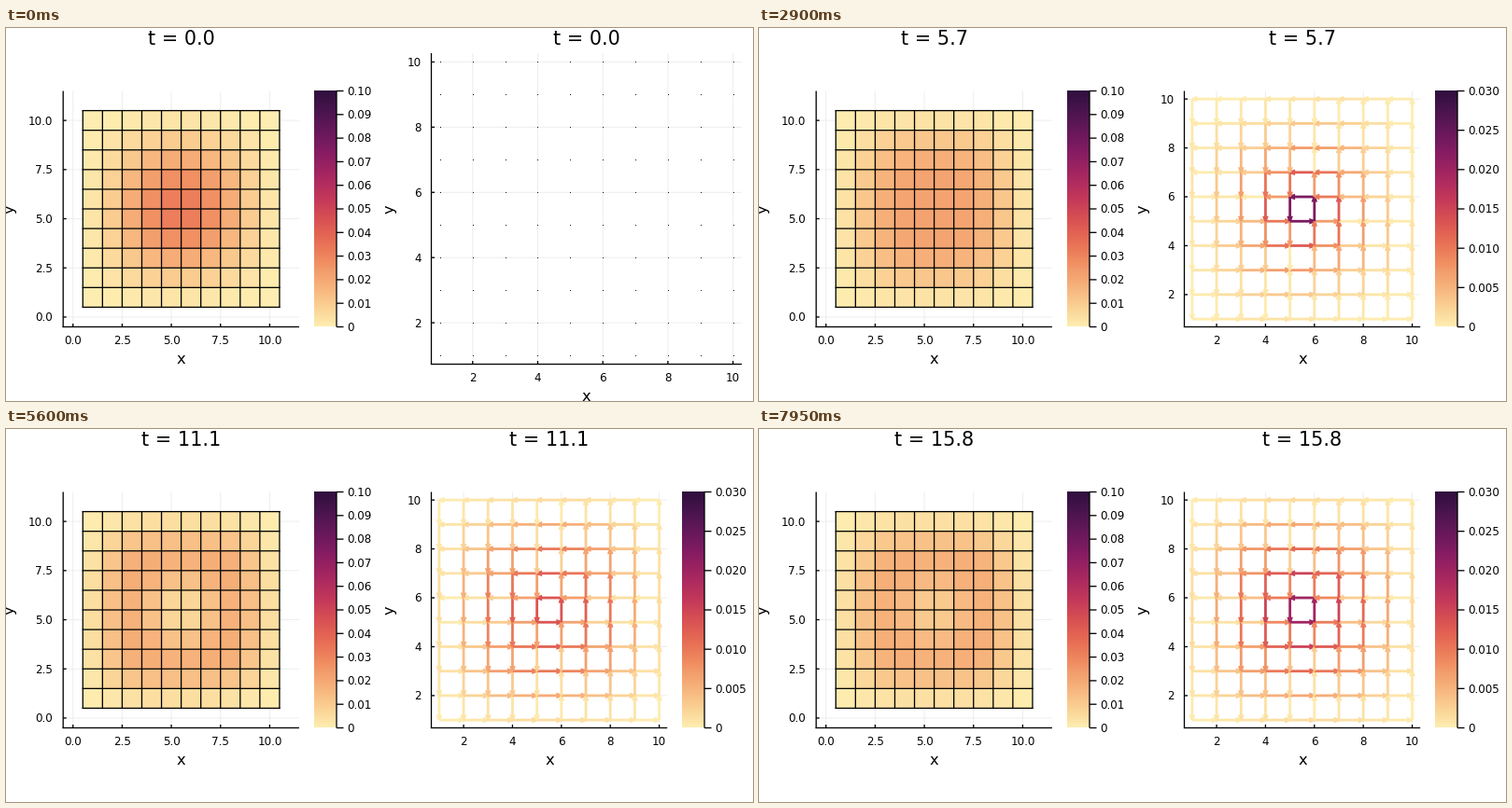
A matplotlib script for the animation above (8000 ms loop, 800 by 400 pixels).

```python
import numpy as np
import matplotlib.pyplot as plt
from matplotlib.animation import FuncAnimation
from matplotlib.collections import PolyCollection
from matplotlib.colors import LinearSegmentedColormap

N = 10
PX = 0.72  # points per pixel at 100 dpi
TICK, LABEL, TITLE = 11.9 * PX, 16.3 * PX, 20.75 * PX

matter = LinearSegmentedColormap.from_list("matter", [
    "#feedb0", "#facd91", "#f6ad77", "#f08e62", "#e76d54", "#d85053",
    "#c3385a", "#a82860", "#8a1d63", "#6b185d", "#4c1550", "#2f0f3e"])

plt.rcParams["font.family"] = "DejaVu Sans"
fig = plt.figure(figsize=(8, 4), dpi=100, facecolor="white")
ax = fig.add_axes([0, 0, 1, 1])
ax.axis("off")


# ---- drawing helpers, all in stage pixels ----
def line(xs, ys, color="black", width=1.3, z=3):
    return ax.plot(xs, ys, color=color, lw=width * PX, zorder=z,
                   solid_capstyle="butt", snap=False)[0]


def text(x, y, s, size=TICK, ha="center", **kw):
    return ax.text(x, y, s, fontsize=size, ha=ha, va=kw.pop("va", "baseline"),
                   color="black", zorder=6, **kw)


def scale(lim, lo, hi):
    return lambda v: lo + (np.asarray(v) - lim[0]) / (lim[1] - lim[0]) * (hi - lo)


def panel(box, lim, ticks, fmt, ylabel_x):
    """Frame, grid, ticks and labels; returns the artists and both scales."""
    x0, x1, y0, y1 = box
    sx, sy = scale(lim, x0, x1), scale(lim, y1, y0)
    parts = [line([x0, x0], [y0, y1 + 0.6]), line([x0 - 0.6, x1], [y1, y1])]
    for v in ticks:
        px, py, label = float(sx(v)), float(sy(v)), fmt % v
        parts += [
            line([px, px], [y0, y1], "#eeeeee", 1, 0),
            line([x0, x1], [py, py], "#eeeeee", 1, 0),
            line([px, px], [y1, y1 - 3.5]),
            line([x0, x0 + 3.5], [py, py]),
            text(px, y1 + 18.3, label),
            text(x0 - 11, py + 4.4, label, ha="right"),
        ]
    mid = (x0 + x1) / 2
    parts += [
        text(mid, y1 + 39.2, "x", LABEL),
        text(ylabel_x, 194, "y", LABEL, va="center", rotation=90),
    ]
    title = text(mid, 18.3, "", TITLE)
    return parts + [title], title, sx, sy


def colorbar(x, top, labels):
    y0, y1 = 67.5, 320.5
    bar = ax.imshow(np.linspace(1, 0, 256)[:, None], cmap=matter, vmin=0,
                    vmax=1, extent=(x, x + 24, y1, y0), aspect="auto",
                    interpolation="bilinear", zorder=1)
    parts = [bar, line([x + 24, x + 24], [y0, y1])]
    for s in labels:
        y = y1 - float(s) / top * (y1 - y0)
        parts += [line([x + 24, x + 31.5], [y, y]),
                  text(x + 35, y + 4.4, s, ha="left")]
    return parts


# ---- charged particle on a square lattice around a growing flux ----
site = np.arange(1, N + 1)
s1 = np.sin(np.pi * site / (N + 1)) ** 2
s2 = np.sin(2 * np.pi * site / (N + 1)) ** 2
norm = (2 / (N + 1)) ** 2
rho_rest = norm * np.outer(s1, s1)
rho_ring = norm / 2 * (np.outer(s1, s2) + np.outer(s2, s1))

edges = []
for i in range(N):
    for j in range(N):
        if i < N - 1:
            edges.append((i, j, i + 1, j))
        if j < N - 1:
            edges.append((i, j, i, j + 1))
edges = np.array(edges)
tail, head = edges[:, :2] + 1, edges[:, 2:] + 1
ti, hi = edges[:, 1] * N + edges[:, 0], edges[:, 3] * N + edges[:, 2]

a, b = tail - 5.5, head - 5.5
angle = np.arctan2(a[:, 0] * b[:, 1] - a[:, 1] * b[:, 0], (a * b).sum(axis=1))
core = np.exp(0.2 - 0.8 * (((a + b) / 2) ** 2).sum(axis=1))

# edge flow that carries density from the resting shape into the ring
incidence = np.zeros((len(edges), N * N))
incidence[np.arange(len(edges)), ti] = 1
incidence[np.arange(len(edges)), hi] = -1
outflow = (rho_rest - rho_ring).ravel()
radial = incidence @ np.linalg.pinv(incidence.T @ incidence) @ outflow

KEY_T = np.array([0, 3.5, 5.7, 8.8, 11.1, 13.1, 15.8])
RING = np.array([0, 0.16, 0.36, 0.74, 0.85, 0.81, 0.73])
FLUX_CORE = np.array([0, 0.235, 0.365, 0.69, 0.78, 0.78, 0.79])
FLUX_RIM = np.array([0, 0.30, 0.50, 0.73, 0.75, 0.78, 0.84])


def smooth(t, values):
    """Cubic Hermite curve through the key values."""
    slope = np.gradient(values, KEY_T)
    if values is RING:
        slope[0] = 0
    k = int(np.clip(np.searchsorted(KEY_T, t, "right") - 1, 0, len(KEY_T) - 2))
    h = KEY_T[k + 1] - KEY_T[k]
    u = (t - KEY_T[k]) / h
    return ((1 + 2 * u) * (1 - u) ** 2 * values[k] + u * (1 - u) ** 2 * h * slope[k]
            + u * u * (3 - 2 * u) * values[k + 1] + u * u * (u - 1) * h * slope[k + 1])


def state(t):
    w = smooth(t, RING)
    rate = (smooth(t + 0.05, RING) - smooth(t - 0.05, RING)) / 0.1
    rho = (1 - w) * rho_rest + w * rho_ring
    flat = rho.ravel()
    flux = core * smooth(t, FLUX_CORE) + (1 - core) * smooth(t, FLUX_RIM)
    spin = 2 * np.sqrt(flat[ti] * flat[hi]) * np.sin(angle * flux)
    return rho, spin - rate * radial  # negative charge: current opposes flow


def arrow_shapes(start, end, half=1.4, length=5.5, wing=3.3):
    d = end - start
    size = np.hypot(d[:, 0], d[:, 1])[:, None]
    d = d / size
    n = np.stack([-d[:, 1], d[:, 0]], axis=1)
    neck = end - d * length
    return np.stack([start + n * half, neck + n * half, neck + n * wing,
                     end + n * half, end - n * half,
                     neck - n * wing, neck - n * half, start - n * half], axis=1)


# ---- left: density ----
_, title_l, lx, ly = panel((61.2, 314, 67.5, 320.5), (-0.5, 11.5),
                           np.arange(0, 10.1, 2.5), "%.1f", 4.5)
border = np.arange(N + 1) + 0.5
cells = ax.pcolormesh(lx(border), ly(border), rho_rest, cmap=matter, vmin=0,
                      vmax=0.1, zorder=1)
bx, by = lx(border), ly(border)
for x, y in zip(bx, by):
    line([x, x], [by[0] + 0.6, by[-1] - 0.6], z=2)
    line([bx[0] - 0.6, bx[-1] + 0.6], [y, y], z=2)
colorbar(330, 0.1, ["0"] + ["%.2f" % (k / 100) for k in range(1, 11)])

# ---- right: empty panel at rest, flow panel afterwards ----
EVEN = range(2, 11, 2)
rest, title_rest, rx, ry = panel((455.5, 788, 27, 360.5), (0.73, 10.27),
                                 EVEN, "%d", 411.5)
gx, gy = np.meshgrid(rx(site), ry(site))
rest.append(ax.scatter(gx.ravel(), gy.ravel(), s=0.35, c="black", marker="s",
                       linewidths=0, zorder=4, snap=False))

flow, title_flow, fx, fy = panel((455.5, 708.2, 67.5, 320.5), (0.68, 10.33),
                                 EVEN, "%d", 411.5)
flow += colorbar(724, 0.03, ["0"] + ["%.3f" % (k / 200) for k in range(1, 7)])
p = np.stack([fx(tail[:, 0]), fy(tail[:, 1])], axis=1)
q = np.stack([fx(head[:, 0]), fy(head[:, 1])], axis=1)
forward, backward = arrow_shapes(p, q), arrow_shapes(q, p)
arrows = PolyCollection(forward, linewidths=0, zorder=4, snap=False)
ax.add_collection(arrows)
flow.append(arrows)

ax.set_xlim(0, 800)
ax.set_ylim(400, 0)


def update(k):
    t = max(0, k - 1) / 10
    rho, current = state(t)
    for title in (title_l, title_rest, title_flow):
        title.set_text("t = %.1f" % t)
    cells.set_array(rho)
    arrows.set_verts(np.where((current >= 0)[:, None, None], forward, backward))
    arrows.set_facecolor(matter(np.clip(np.abs(current) / 0.03, 0, 1)))
    for part in rest:
        part.set_visible(t == 0)
    for part in flow:
        part.set_visible(t > 0)
    return []


anim = FuncAnimation(fig, update, frames=160, interval=50, repeat=True,
                     repeat_delay=0, blit=False)
plt.show()
```
